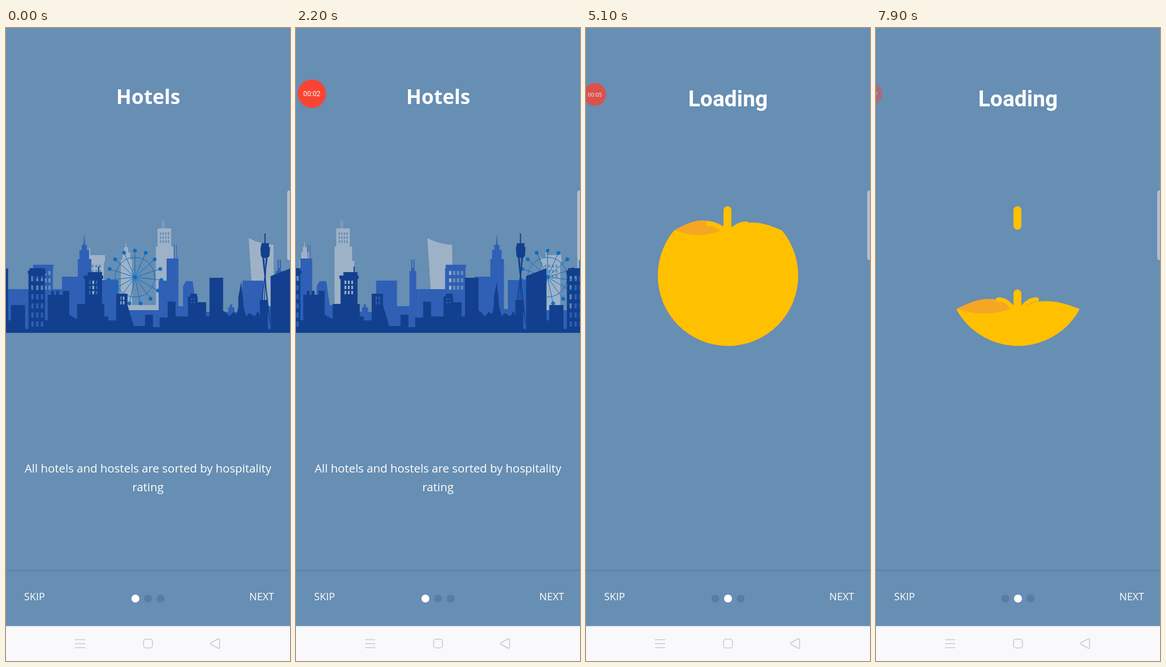
An HTML page that plays this animation: 502x1115 px, repeating every 8 s.

```html
<!DOCTYPE html>
<html lang="en">
<head>
<meta charset="utf-8">
<title>Onboarding</title>
<style>
html, body { margin: 0; width: 100%; height: 100%; overflow: hidden; background: #678eb3; }
svg { display: block; width: 100vw; height: 100vh; }
text { fill: #fff; font-family: "Open Sans", "Noto Sans", sans-serif; }
.mid { text-anchor: middle; }
.roboto { font-family: Roboto, sans-serif; }
.note { font-size: 20.4px; }
.nav { font-size: 18px; }
</style>
</head>
<body>
<svg viewBox="0 0 502 1115">
  <defs>
    <clipPath id="strip"><rect y="300" width="502" height="237"/></clipPath>
    <clipPath id="bowl"><circle cx="251" cy="436" r="124"/></clipPath>
  </defs>
  <rect width="502" height="1115" fill="#678eb3"/>

  <g id="hotels">
    <text class="mid" x="251.5" y="133.5" font-size="35.3" font-weight="700">Hotels</text>
    <g id="city" clip-path="url(#strip)" fill-rule="evenodd"></g>
    <text class="mid note" x="251" y="783">All hotels and hostels are sorted by hospitality</text>
    <text class="mid note" x="251" y="816">rating</text>
  </g>

  <g id="loading">
    <text class="mid roboto" x="251" y="138" font-size="39" font-weight="700">Loading</text>
    <g clip-path="url(#bowl)">
      <path id="back" fill="#f5a623"/>
      <path id="front" fill="#ffc000"/>
    </g>
    <path id="splash" fill="#4fa66f" stroke="#ffc000" stroke-width="8" stroke-linecap="round"/>
    <path id="fall" stroke="#ffc000" stroke-width="14" stroke-linecap="round" clip-path="url(#bowl)"/>
  </g>

  <path d="M0 955.5H502" stroke="#587da5" stroke-width="1.3"/>
  <text class="nav" x="32" y="1008">SKIP</text>
  <text class="nav" x="474" y="1008" text-anchor="end">NEXT</text>
  <g id="dots">
    <circle cx="228.7" cy="1005" r="7"/>
    <circle cx="251" cy="1005" r="7"/>
    <circle cx="273.3" cy="1005" r="7"/>
  </g>
  <path d="M503 286H501Q497 286 497 291V404Q497 409 501 409H503Z" fill="#b2becb"/>

  <rect y="1053.5" width="502" height="62" fill="#f9f8fb"/>
  <g fill="none" stroke="#c9c8cc" stroke-width="1.5" stroke-linejoin="round">
    <path d="M122 1077.5H140M122 1084.5H140M122 1091.5H140"/>
    <rect x="243.3" y="1076.5" width="15.5" height="15.5" rx="4"/>
    <path d="M362 1083Q361 1084.3 362 1085.5L375 1092.5Q377.5 1093.5 377.5 1091V1077.5Q377.5 1075 375 1076Z"/>
  </g>

  <g id="badge">
    <circle r="25" fill="#f94434"/>
    <text id="clock" class="mid roboto" y="4.4" font-size="12.2"></text>
  </g>
</svg>
<script>
const LOOP = 8000, TAU = Math.PI * 2;
const $ = id => document.getElementById(id);
const clamp = v => Math.max(0, Math.min(1, v));
const mix = (a, b, k) => a + (b - a) * k;

// A grid of window holes, cut out by the even-odd rule
function holes(x, y, cols, rows, dx, dy, w, h) {
  let d = '';
  for (let r = 0; r < rows; r++)
    for (let c = 0; c < cols; c++)
      d += `M${x + c * dx} ${y + r * dy}h${w}v${h}h${-w}Z`;
  return d;
}

const far =
  'M141 536V412H138V404H147V388H149V400H175V412H173V536Z' +
  'M203 536V408H206V395H209V386H211L212 373 213 386H216V395H220V408H223V488H265V385H268V353H276V337H277V353H279V340H280V353H292V385H296V410H300V536Z' +
  'M435 536V460L429 370Q447 380 473 382V536Z' +
  holes(145, 417, 4, 3, 6.5, 9, 3.5, 5) + holes(272, 360, 4, 3, 4.7, 7, 2.5, 4.5);

const middle =
  'M0 536V460H47V423H48V417H84V423H83V460H99V438H127V407H130V391H134V382H137L138.5 362 140 382H143V391H147V407H151' +
  'V495H158V444H199V497H270V445H284V406H297V382H298V406H301V382H302V406H305V490H313V455L318 446H330L336 488H354' +
  'V500H393V492H396V487H400V492H404V500H412V468H418V445H455V490H477V428H480V408H482V423H484V408H486V428H489V460H493V536Z' +
  holes(54, 428, 4, 3, 7, 13, 4, 7);

const near =
  'M4 537V515H9V488H34V530H40V433H39V427H42V423H69V427H71V433H69V515H74V470H80V463H85V470H89V463H94V470H101V463H112' +
  'V505L126 513V486H140V442H138V436H145V430H163V420H165V430H170V436H172V442H170V486H174V508H181V515H195V468H215V488' +
  'L226 525H246V505H260V527H272V510H286V482H300V508H322V473H326V468H338V473H339V483H354V508H360V440H384V498' +
  'L390 502 395 508 402 500 408 504 411 490V474L416 447 419 474 420 490 425 508 430 502 440 508 446 498 449 508' +
  'V479H463V530H468V437L504 423V537Z' +
  holes(45, 437, 3, 6, 8.5, 16, 4, 9) + holes(147, 445, 3, 3, 6, 9, 3, 6) +
  holes(202, 473, 2, 2, 5, 8, 2.5, 6) + holes(327, 476, 2, 2, 5, 6, 2, 3);

const tower = '<path d="M457 362H459V379H465V386H467L466 402 462 405H454L451 402 450 388 452 379H457Z"/>' +
  '<path d="M454 404L467 520M456 404L463 500M462 404L452 484M460 404L457 484" stroke="#12408e" stroke-width="1.6"/>';

function wheel(x, y) {
  let spokes = '', cabins = '';
  for (let i = 0; i < 15; i++) {
    const a = i * TAU / 15, px = x + 47 * Math.sin(a), py = y - 47 * Math.cos(a);
    spokes += `M${x} ${y}L${px} ${py}`;
    cabins += `<circle cx="${px}" cy="${py}" r="3.3"/>`;
  }
  return `<g fill="#0b6dc0">${cabins}<circle cx="${x}" cy="${y}" r="3"/>` +
    `<g fill="none" stroke="#0b6dc0"><path d="${spokes}"/><circle cx="${x}" cy="${y}" r="35"/></g></g>`;
}

function layer(width, color, d, extra, shift) {
  const g = document.createElementNS('http://www.w3.org/2000/svg', 'g');
  g.setAttribute('fill', color);
  for (const x of [-width, 0, width])
    g.innerHTML += `<g transform="translate(${x})"><path d="${d}"/>${extra}</g>`;
  $('city').append(g);
  return { g, width, shift };
}

const layers = [
  layer(491, '#9eb2c7', far, '', t => .094 * t - 10 * clamp(t / 800)),
  layer(493, '#2f60b6', middle, wheel(228, 439), t => .1256 * t),
  layer(500, '#12408e', near, tower, t => .255 * t)
];

const move = (el, x, y = 0, k = 1) =>
  el.setAttribute('transform', `translate(${x} ${y}) scale(${k})`);

// Liquid surface height: slow rise, full pause, then a fresh fill
function level(t) {
  if (t < 4200) return mix(455, 396, (t - 2800) / 1400);
  if (t < 6700) return mix(396, 304, clamp((t - 4200) / 2100));
  return mix(565, 495, (t - 6700) / 1200);
}

// A standing wave held at the rim of the bowl
function wave(y, amp) {
  const half = Math.sqrt(Math.max(1, 124 ** 2 - (y - 436) ** 2));
  let d = `M100 570V${y}`;
  for (let i = 0; i <= 60; i++) {
    const u = i / 60;
    const lift = 4 * Math.sin(Math.PI * u) - amp * Math.sin(TAU * u);
    d += `L${251 + half * (2 * u - 1)} ${y - lift}`;
  }
  return d + `L402 ${y}V570Z`;
}

function drawLiquid(t) {
  const y = level(t), sway = Math.cos((t - 4200) / 930 * TAU);
  $('front').setAttribute('d', wave(y, 11 * sway));
  $('back').setAttribute('d', wave(y, -15 * sway));

  const speed = .1822, gap = 178, length = 73;
  const phase = (4 + speed * (t - 2800) + gap * 20) % gap;
  let stream = '', splash = '';
  for (let fallen = phase; fallen < 400; fallen += gap) {
    if (t >= 6700 && t - fallen / speed < 6650) continue;
    const head = 312 + fallen, tail = Math.max(314, head - length);
    const end = Math.min(head, y + 12);
    if (fallen > 12 && end - tail > 14) stream += `M250 ${tail + 7}V${end - 7}`;
    const age = (head - y) / speed;
    if (age > 0 && age < 500 && y > 330) {
      const h = Math.sin(age / 500 * Math.PI);
      for (const side of [-1, 1])
        splash += `M${250 + side * 6} ${y + 2}Q${250 + side * 19} ${y - 18 * h} ${250 + side * 34} ${y + 1 - 18 * h}`;
    }
  }
  $('fall').setAttribute('d', stream);
  $('splash').setAttribute('d', splash);
}

function drawBadge(t) {
  const shrink = clamp((t - 2450) / 200), hide = clamp((t - 5300) / 300);
  move($('badge'), mix(mix(28, 15.5, shrink), -9, hide), mix(115.7, 117, shrink) - hide, mix(1, .8, shrink));
  $('badge').setAttribute('opacity', t < 100 ? 0 : mix(mix(1, .8, shrink), .45, hide));
  $('clock').textContent = '00:0' + Math.floor(t / 1000);
}

function draw() {
  const t = performance.now() % LOOP;
  const swipe = 502 * (1 - (1 - clamp((t - 2400) / 677)) ** 4);
  move($('hotels'), -swipe);
  move($('loading'), 502 - swipe);
  for (const { g, width, shift } of layers) move(g, -(shift(t) % width));
  drawLiquid(t);
  drawBadge(t);
  const page = t < 2550 ? 0 : 1;
  [...$('dots').children].forEach((dot, i) => dot.setAttribute('fill', i === page ? '#fff' : '#587ca3'));
  requestAnimationFrame(draw);
}
draw();
</script>
</body>
</html>
```
